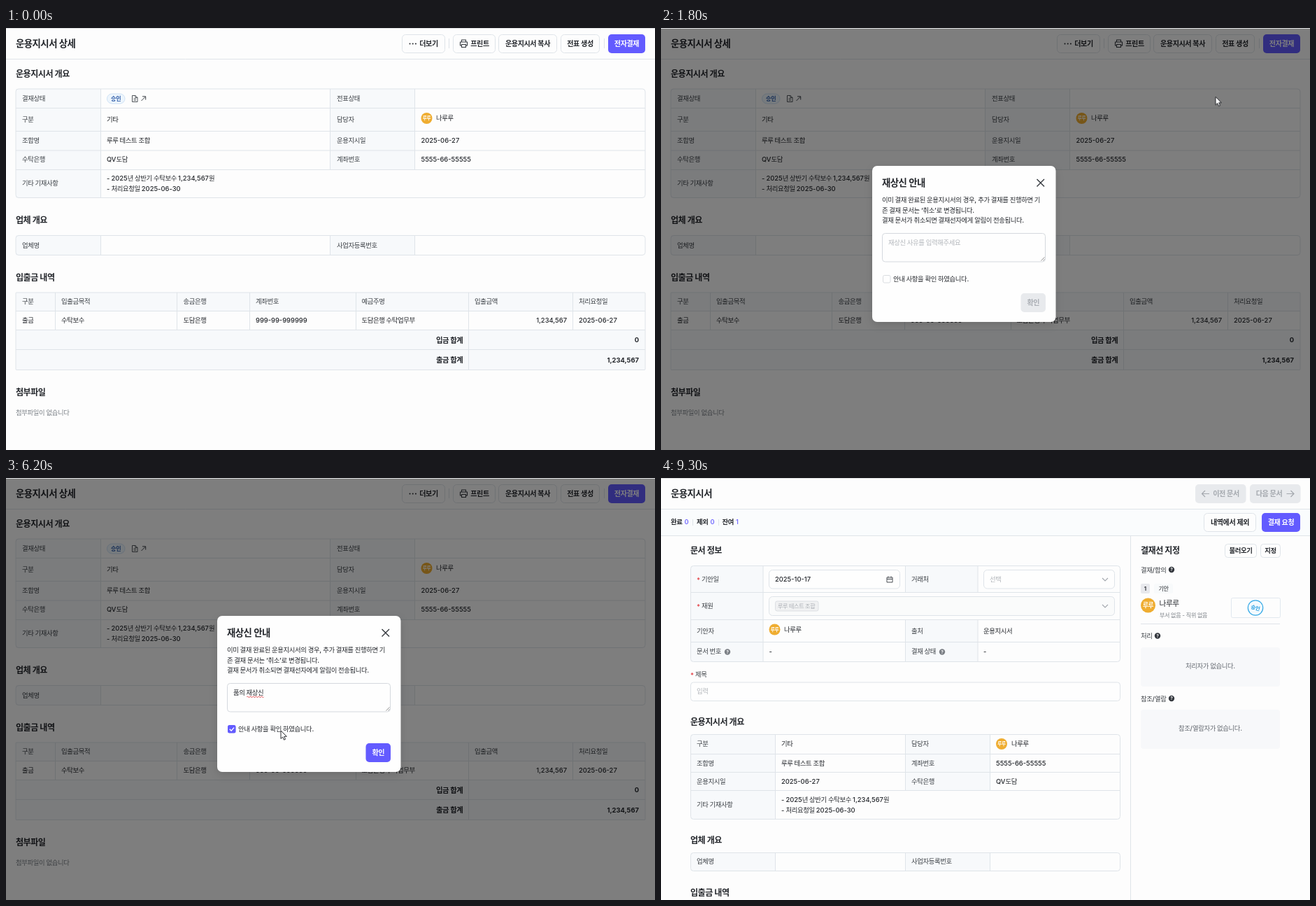
An HTML page that plays this animation: 928x603 px, repeating every 9400 ms.

```html
<!DOCTYPE html>
<html lang="ko">
<head>
<meta charset="utf-8">
<title>운용지시서</title>
<style>
html,body{margin:0;width:100%;height:100%;overflow:hidden;background:#fdfdfd}
svg{display:block}
#stage{width:928px;height:603px}
text{font-family:Inter,"Noto Sans CJK KR","Noto Sans CJK",sans-serif;white-space:pre}
.k{letter-spacing:-.04em}
.u{text-decoration:underline;text-decoration-thickness:1px}
.anim{animation:9.4s step-end infinite}

#detail{animation-name:detail}
#draft{animation-name:draft}
#hover{animation-name:hover}
#dim{animation-name:dim}
#modal{animation-name:modal;transform-origin:890px 28px}
#focus{animation-name:focus}
#caret{animation-name:caret}
#typed{animation-name:typed}
.checked{animation-name:checked}
#okHover{animation-name:okHover}
#thumb{animation-name:thumb}
#cursor{animation-name:cursor}
#arrow{animation-name:arrow}
#beam{animation-name:beam}

@keyframes detail{0%{opacity:1}79.78%,100%{opacity:0}}
@keyframes draft{0%{opacity:0}79.78%,100%{opacity:1}}
@keyframes hover{0%{opacity:0}1.06%{opacity:.6}2.12%{opacity:1}18.08%,100%{opacity:0}}
@keyframes dim{0%{opacity:0}17.02%,100%{opacity:1}}
@keyframes modal{
  0%{opacity:0;transform:scale(.2)}
  17.02%{opacity:.88;transform:scale(.85)}
  18.08%{opacity:1;transform:scale(.985)}
  19.14%,100%{opacity:1;transform:none}
}
@keyframes focus{0%{opacity:0}23.4%{opacity:1}62.76%,100%{opacity:0}}
@keyframes caret{0%{opacity:0}23.4%{opacity:1}28.72%,100%{opacity:0}}
@keyframes typed{
  0%{transform:none}
  32.97%{transform:translateY(-20px)}
  34.04%{transform:translateY(-40px)}
  36.17%{transform:translateY(-60px)}
  38.29%{transform:translateY(-80px)}
  39.36%{transform:translateY(-100px)}
  40.42%{transform:translateY(-120px)}
  41.48%{transform:translateY(-140px)}
  42.55%{transform:translateY(-160px)}
  43.61%{transform:translateY(-180px)}
  44.68%{transform:translateY(-200px)}
  45.74%{transform:translateY(-220px)}
  51.06%{transform:translateY(-240px)}
  52.12%{transform:translateY(-260px)}
  62.76%,100%{transform:translateY(-280px)}
}
@keyframes checked{0%{opacity:0}62.76%,100%{opacity:1}}
@keyframes okHover{0%{opacity:0}71.27%,100%{opacity:1}}
@keyframes thumb{0%{opacity:0}81.91%{opacity:.5}82.97%{opacity:1}95.74%,100%{opacity:0}}
@keyframes cursor{
  0%{transform:translate(893px,31px)}
  2.12%{transform:translate(889.5px,27.5px)}
  18.08%{transform:translate(889.5px,27.5px);animation-timing-function:steps(3)}
  21.27%{transform:translate(600px,240px);animation-timing-function:steps(2)}
  23.4%{transform:translate(502px,321px)}
  25.53%{transform:translate(501px,323px)}
  56.38%{transform:translate(501px,323px);animation-timing-function:steps(4)}
  60.63%{transform:translate(321px,357px)}
  63.82%{transform:translate(321px,357px);animation-timing-function:steps(3)}
  67.02%{transform:translate(429px,363px)}
  69.14%{transform:translate(450px,370px)}
  70.21%{transform:translate(473px,369px)}
  71.27%{transform:translate(545px,404px)}
  73.4%{transform:translate(543px,399.5px)}
  84.04%{transform:translate(543px,399.5px);animation-timing-function:steps(4)}
  88.29%{transform:translate(738px,288px);animation-timing-function:steps(3)}
  91.48%{transform:translate(860px,120px);animation-timing-function:steps(3)}
  94.68%,100%{transform:translate(910.5px,12.5px)}
}
@keyframes arrow{0%{opacity:0}1.06%{opacity:1}23.4%{opacity:0}58.51%{opacity:1}95.74%,100%{opacity:0}}
@keyframes beam{0%{opacity:0}23.4%{opacity:1}58.51%,100%{opacity:0}}
</style>
</head>
<body>
<svg id="stage" viewBox="0 0 928 603"></svg>
<script>
const INK = '#24272c', LABEL = '#3c4046', MUTED = '#7b8087', FAINT = '#b2b6bb';
const EDGE = '#dfe4e9', SOFT = '#f7f9fb', BRAND = '#635bff', DARK = '#564ce6', PAPER = '#fdfdfd';
const PERSON = '나루루', NICK = '루루', FUND = '루루 테스트 조합', BANK = 'QV도담';
const ACCOUNT = '5555-66-55555';
const BASE = 9.4, BTN = 10.05, HEAD = 12.06, TITLE = 13.4;

// Text is placed by its vertical middle; Hangul runs are set a little tighter.
const tight = s => s.replace(/[ㄱ-ㅎ가-힣 ]+/g, '<tspan class="k">$&</tspan>');
const text = (x, y, s, {size = BASE, fill = INK, w = 500, at = 'start', extra = ''} = {}) =>
  `<text x="${x}" y="${(y + size * .37).toFixed(2)}" font-size="${size}" font-weight="${w}" fill="${fill}" text-anchor="${at}" ${extra}>${tight(s)}</text>`;
const label = (x, y, s) => text(x, y, s, {fill: LABEL});
const head = (x, y, s, size = HEAD) => text(x, y, s, {size, w: 600});
const box = (x1, y1, x2, y2, fill = 'none', stroke = 'none', r = 0, extra = '') =>
  `<rect x="${x1}" y="${y1}" width="${x2 - x1}" height="${y2 - y1}" rx="${r}" fill="${fill}" stroke="${stroke}" ${extra}/>`;
const path = (d, stroke = EDGE, w = 1, extra = '') =>
  `<path d="${d}" fill="none" stroke="${stroke}" stroke-width="${w}" ${extra}/>`;
const dot = (x, y, r, fill, extra = '') => `<circle cx="${x}" cy="${y}" r="${r}" fill="${fill}" ${extra}/>`;
const group = (id, body, cls = 'anim') => `<g id="${id}" class="${cls}">${body}</g>`;

const button = (x1, y1, x2, y2, s, cx = (x1 + x2) / 2) =>
  box(x1, y1, x2, y2, PAPER, EDGE, 5) + text(cx, (y1 + y2) / 2 - .5, s, {size: BTN, w: 600, at: 'middle'});
const solid = (x1, y1, x2, y2, s, fill = BRAND, ink = '#fff', cx = (x1 + x2) / 2) =>
  box(x1, y1, x2, y2, fill, 'none', 5) + text(cx, (y1 + y2) / 2 - .3, s, {size: BTN, w: 600, fill: ink, at: 'middle'});
const avatar = (x, y, r = 8) =>
  dot(x, y, r, '#efad31') + text(x, y, NICK, {size: r * .82, w: 700, fill: '#fff', at: 'middle'});
const help = (x, y, fill = '#33373d') =>
  dot(x, y, 4.2, fill) + text(x, y, '?', {size: 6.5, w: 700, fill: '#fff', at: 'middle'});
const star = (x, y) => text(x, y + 1, '*', {fill: '#e5484d', w: 600});
const chevron = (x, y) => path(`M${x - 4} ${y - 2}l4 4 4-4`, '#a3a8ae', 1.1);

// Shaded cells, row lines, column lines [x, y1, y2], outer border.
const table = (x1, y1, x2, y2, shades, rows, cols, r = 4) =>
  box(x1, y1, x2, y2, PAPER, 'none', r) +
  shades.map(s => box(...s, SOFT, 'none')).join('') +
  path(rows.map(y => `M${x1} ${y}H${x2}`).join('') + cols.map(([x, a, b]) => `M${x} ${a}V${b}`).join('')) +
  box(x1, y1, x2, y2, 'none', EDGE, r);

const memo = (x, y, gap) =>
  text(x, y, '- 2025년 상반기 수탁보수 1,234,567원') + text(x, y + gap, '- 처리요청일 2025-06-30');

const printer = path('M651.5 20v-3h6v3M651.5 25h-2v-5h10v5h-2M651.5 23.5h6v4h-6z', '#33373d', 1.1, 'stroke-linejoin="round"');

const detail = head(14, 22.5, '운용지시서 상세', TITLE) + path('M0 44.5H928M633.5 15V29M855.5 15V29') +
  button(566.5, 9.5, 627.5, 35.5, '더보기', 604.5) +
  [577.5, 581.7, 585.9].map(x => dot(x, 22.5, 1, INK)).join('') +
  button(639.5, 9.5, 699.5, 35.5, '프린트', 677.5) + printer +
  button(704.5, 9.5, 787.5, 35.5, '운용지시서 복사') +
  button(793.5, 9.5, 848.5, 35.5, '전표 생성') +
  solid(861, 9, 914, 36, '전자결재') +
  group('hover', solid(861, 9, 914, 36, '전자결재', DARK)) +

  head(14, 65.5, '운용지시서 개요') +
  table(14, 87, 914, 242.5, [[14, 87, 135.5, 242.5], [463.5, 87, 584.5, 202.5]],
    [114.5, 147.5, 175, 202.5], [[135.5, 87, 242.5], [463.5, 87, 202.5], [584.5, 87, 202.5]]) +
  label(23, 101, '결재상태') + label(473, 101, '전표상태') +
  box(144.5, 94, 170, 108, '#eef6fd', '#cfe2f5', 7) +
  text(157.2, 101, '승인', {size: 8.05, w: 600, fill: '#2c5aa8', at: 'middle'}) +
  path('M180.5 96.5h4.5l3 3v6h-7.500zM182.500 101h3.500M182.500 103.200h3.500M185 96.500v3h3', '#3f444a', .9) +
  path('M193.500 104l6-6M195 97.800h4.700v4.700', '#3f444a', 1) +
  label(23, 131, '구분') + text(144, 131, '기타') + label(473, 131, '담당자') +
  avatar(601.5, 129) + text(615, 129, PERSON) +
  label(23, 160.5, '조합명') + text(144, 160.5, FUND) +
  label(473, 160.5, '운용지시일') + text(593.5, 160.5, '2025-06-27') +
  label(23, 188, '수탁은행') + text(144, 188, BANK) +
  label(473, 188, '계좌번호') + text(593.5, 188, ACCOUNT) +
  label(23, 222, '기타 기재사항') + memo(144, 215, 14.5) +

  head(14, 275, '업체 개요') +
  table(14, 296.5, 914, 324.5, [[14, 296.5, 135.5, 324.5], [463.5, 296.5, 584.5, 324.5]], [],
    [135.5, 463.5, 584.5].map(x => [x, 296.5, 324.5])) +
  label(23, 310.5, '업체명') + label(473, 310.5, '사업자등록번호') +

  head(14, 357, '입출금 내역') +
  table(14, 378, 914, 488.5, [[14, 378, 914, 404.5], [14, 431.5, 914, 488.5]], [404.5, 431.5, 459.5],
    [...[70.5, 244.5, 348.5, 500.5, 810.5].map(x => [x, 378, 431.5]), [661.5, 378, 488.5]], 1) +
  [[23, '구분', '출금'], [79, '입출금목적', '수탁보수'], [253.5, '송금은행', '도담은행'],
   [357, '계좌번호', '999-99-999999'], [508.5, '예금주명', '도담은행 수탁업무부'],
   [670, '입출금액', ''], [819, '처리요청일', '2025-06-27']]
    .map(([x, a, b]) => label(x, 391, a) + text(x, 418, b)).join('') +
  text(802, 418, '1,234,567', {at: 'end'}) +
  [['입금 합계', '0', 445.7], ['출금 합계', '1,234,567', 474.5]].map(([a, b, y]) =>
    text(653.5, y, a, {size: 10.4, w: 700, at: 'end'}) + text(905, y, b, {w: 700, at: 'end'})).join('') +
  head(14, 521, '첨부파일') + text(14, 549.5, '첨부파일이 없습니다', {fill: MUTED, w: 400});

const last = '품의 재상신';
const steps = ['ㅍ', '푸', '품', '품ㅇ', '품의', '품의 ', '품의 ㅈ', '품의 재', '품의 재ㅅ', '품의 재상', '품의 재상ㅅ', '품의 재상시', last];
const composing = s => s.endsWith(' ') ? tight(s) : tight(s.slice(0, -1)) + `<tspan class="k u">${s.slice(-1)}</tspan>`;
const lines = text(5, 10.5, '재상신 사유를 입력해주세요', {fill: FAINT}) +
  steps.map((s, i) => `<text x="5" y="${34 + i * 20}" font-size="${BASE}" font-weight="500" fill="${INK}">${composing(s)}</text>`).join('') +
  text(5, 290.5, last) + path('M24.500 296.800q1-2 2 0' + 't2 0'.repeat(11), '#e0393e', 1);

const modal = box(302, 197, 564.5, 420, '#fefefe', 'none', 7, 'style="filter:drop-shadow(0 4px 6px rgba(0,0,0,.12))"') +
  head(316, 221.5, '재상신 안내', TITLE) + path('M537.500 216l10.500 10.500M548 216l-10.500 10.500', '#33373d', 1.4) +
  ['이미 결재 완료된 운용지시서의 경우, 추가 결재를 진행하면 기', '존 결재 문서는 ‘취소’로 변경됩니다.', '결재 문서가 취소되면 결재선자에게 알림이 전송됩니다.']
    .map((s, i) => text(316, 246 + i * 14.4, s)).join('') +
  box(316.5, 293.5, 549.5, 334, '#fefefe', '#d5d9de', 4) +
  group('focus', box(316.5, 293.5, 549.5, 334, 'none', '#5a50ee', 4, 'stroke-width="1.2"')) +
  path('M543.500 332.500l5-5M546.500 332.500l2-2', '#777', .8) +
  `<svg x="320" y="296" width="220" height="20">${group('typed', lines)}</svg>` +
  group('caret', path('M325.500 301V313', INK)) +
  box(317.5, 353.5, 328, 364, '#fefefe', '#d9dce0', 2) +
  `<g class="anim checked">${box(317, 353, 328.5, 364.5, BRAND, 'none', 2.5)}${path('M319.800 358.800l2.300 2.400 4-4.600', '#fff', 1.4)}</g>` +
  text(332, 358.5, '안내 사항을 확인 하였습니다.') +
  solid(514.5, 379, 550, 406, '확인', '#e8eaed', '#a9adb3') +
  `<g class="anim checked">${solid(514.5, 379, 550, 406, '확인')}</g>` +
  group('okHover', solid(514.5, 379, 550, 406, '확인', DARK));

const counts = [['완료', '0', 14], ['제외', '0', 51], ['잔여', '1', 87.5]].map(([s, n, x]) =>
  text(x, 63, s, {w: 600}) + text(x + 19.5, 63, n, {fill: BRAND, w: 500})).join('');
const empty = (y, s) => box(686, y, 885, y + 56, '#f7f8fa', 'none', 4) +
  text(785.5, y + 27, s, {fill: '#666b72', at: 'middle'});
const small = (x1, x2, s) => box(x1, 94.5, x2, 113.5, PAPER, EDGE, 4) +
  text((x1 + x2) / 2, 104, s, {w: 600, at: 'middle'});

const draft = box(0, 1, 928, 603, PAPER) + head(14, 22.5, '운용지시서', TITLE) +
  box(0, 45, 928, 82, '#fafcfd') + path('M0 44.5H928M0 82.5H928M671.5 83V603M45.5 59V68M82.5 59V68') +
  solid(764, 9, 836.5, 36, '이전 문서', '#e8eaed', '#a4a8ae', 808) +
  solid(842, 9, 914.5, 36, '다음 문서', '#e8eaed', '#a4a8ae', 869.5) +
  path('M784 22.500h-10.500M778 18l-4.500 4.500 4.500 4.500M894.500 22.500H905M900.500 18l4.500 4.500-4.500 4.500', '#a4a8ae', 1.2) +
  counts + button(776.5, 50.5, 850.5, 76.5, '내역에서 제외') + solid(859, 50, 914, 77, '결재 요청') +

  head(42, 104, '문서 정보') +
  table(42.5, 125.5, 656.5, 262.5, [[42.5, 125.5, 146, 262.5], [349.5, 125.5, 453, 163.5], [349.5, 202.5, 453, 262.5]],
    [163.5, 202.5, 234.5], [[146, 125.5, 262.5], ...[349.5, 453].flatMap(x => [[x, 125.5, 163.5], [x, 202.5, 262.5]])]) +
  star(51, 144.5) + label(58, 144.5, '기안일') + box(154.5, 131.5, 341.5, 158, '#fefefe', EDGE, 5) +
  text(163, 144.5, '2025-10-17') +
  path('M323 142h8v7h-8zM323 144.500h8M325 140.500v2M329 140.500v2', '#4a4f55', 1) +
  label(358, 144.5, '거래처') + box(461.5, 131.5, 648.5, 158, '#fefefe', EDGE, 5) +
  text(470, 144.5, '선택', {fill: FAINT}) + chevron(635, 145) +
  star(51, 183) + label(58, 183, '재원') + box(154.5, 169.5, 648.5, 196.5, '#fafbfb', EDGE, 5) +
  box(163.5, 176, 225, 190, '#f0f1f2', '#dcdfe3', 2.5) + text(167, 183, FUND, {size: 8.05, fill: '#a9adb3'}) + chevron(635, 183) +
  label(51, 218.5, '기안자') + avatar(162.5, 216.5) + text(176, 216.5, PERSON) +
  label(358, 218.5, '출처') + text(461, 218.5, '운용지시서') +
  label(51, 248, '문서 번호') + help(95, 248.5, '#7b7f85') + text(154.5, 248, '-') +
  label(358, 248, '결재 상태') + help(402, 248.5, '#7b7f85') + text(461, 248, '-') +
  star(42, 281) + label(49, 281, '제목') + box(42.5, 292, 656.5, 318.5, '#fefefe', EDGE, 4) +
  text(51, 305, '입력', {fill: FAINT}) +

  head(42, 349, '운용지시서 개요') +
  table(42.5, 366.5, 656.5, 487.5, [[42.5, 366.5, 163, 487.5], [349.5, 366.5, 470.5, 446.5]],
    [394.5, 420.5, 446.5], [[163.5, 366.5, 487.5], [349.5, 366.5, 446.5], [470.5, 366.5, 446.5]]) +
  label(51, 380, '구분') + text(172, 380, '기타') + label(358, 380, '담당자') + avatar(487, 380) + text(501, 380, PERSON) +
  label(51, 407.5, '조합명') + text(172, 407.5, FUND) + label(358, 407.5, '계좌번호') + text(479, 407.5, ACCOUNT) +
  label(51, 433.5, '운용지시일') + text(172, 433.5, '2025-06-27') + label(358, 433.5, '수탁은행') + text(479, 433.5, BANK) +
  label(51, 466.5, '기타 기재사항') + memo(172, 460, 14.3) +

  head(42, 518, '업체 개요') +
  table(42.5, 535.5, 656.5, 561.5, [[42.5, 535.5, 163, 561.5], [349.5, 535.5, 470.5, 561.5]], [],
    [163.5, 349.5, 470.5].map(x => [x, 535.5, 561.5])) +
  label(51, 548, '업체명') + label(358, 548, '사업자등록번호') +
  head(42, 592.5, '입출금 내역') +

  head(686, 104, '결재선 지정') + small(806.5, 851.5, '불러오기') + small(857.5, 885.5, '지정') +
  label(686, 131.5, '결재/합의') + help(730, 131) +
  box(686, 151, 699, 165, '#e8e9ed', 'none', 2) + text(692.5, 158, '1', {size: 8.05, w: 600, at: 'middle'}) +
  box(705, 151, 732, 165, '#f8fafb', 'none', 2) + text(718.5, 158, '기안', {size: 8.05, at: 'middle'}) +
  avatar(696.5, 182, 10.5) + text(712.5, 179, PERSON, {size: 10.7}) +
  text(713, 196.5, '부서 없음 - 직위 없음', {size: 8.05, fill: MUTED, w: 400}) +
  box(815.5, 171.5, 885.5, 199.5, PAPER, '#e1e8ef', 2) +
  dot(850, 185.5, 10.7, '#f3fafe', 'stroke="#35a9e6" stroke-width="1.2"') +
  text(850, 185.5, '승인', {size: 7.4, w: 700, fill: '#1f9be0', at: 'middle', extra: 'transform="rotate(14 850 185.5)"'}) +
  path('M686 208.5H885') +
  label(686, 226, '처리') + help(710, 225.5) + empty(242, '처리자가 없습니다.') +
  label(686, 315.5, '참조/열람') + help(730, 315) + empty(331, '참조/열람자가 없습니다.') +
  group('thumb', box(921.5, 85.5, 926.5, 411.5, '#d0d2d5', 'none', 2.5));

const cursor =
  group('arrow', '<path d="M0 0V11.500L2.700 9.100L4.500 13.200L6.500 12.300L4.700 8.300H8.300Z" fill="#fff" stroke="#16181c" stroke-width=".9" stroke-linejoin="round"/>') +
  group('beam', path('M-2.500 -5.500H2.500M0 -5.500V5.500M-2.500 5.500H2.500', '#24272c', 1));

document.getElementById('stage').innerHTML =
  box(0, 0, 928, 603, PAPER) +
  group('detail', detail + group('dim', box(0, 1, 928, 603, '#000', 'none', 0, 'opacity=".5"')) + group('modal', modal)) +
  group('draft', draft) + box(0, 0, 928, 1, '#dcdee1') + group('cursor', cursor);
</script>
</body>
</html>
```
